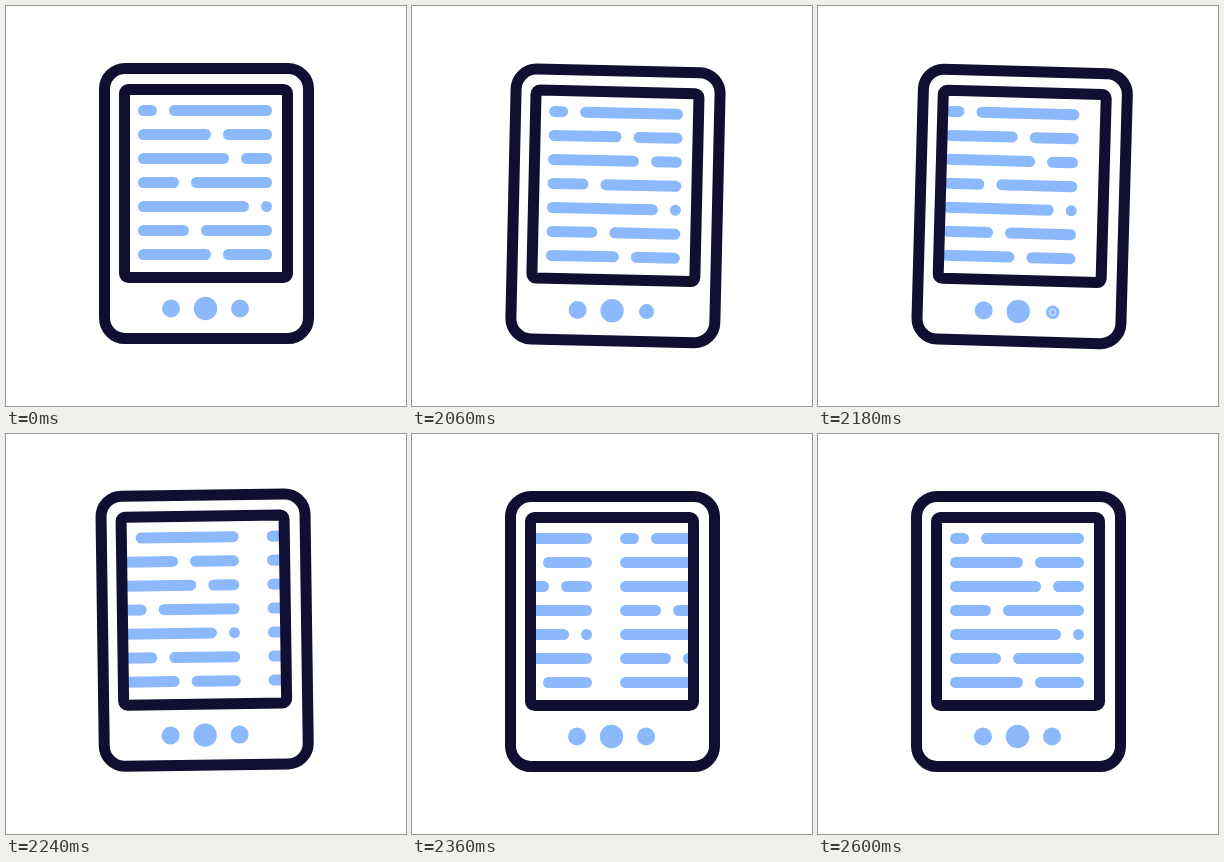
Animation, 400 px wide and 400 px high, one loop 2690 ms. Source, as an HTML page:

```html
<!DOCTYPE html>
<html lang="en">
<head>
<meta charset="utf-8">
<title>E-reader page turn</title>
<style>
  html, body { margin: 0; width: 100%; height: 100%; overflow: hidden; background: #fff; }
  svg { display: block; width: 100%; height: 100%; }
  .frame { fill: none; stroke: #110f31; stroke-width: 11; }
  .line { fill: none; stroke: #8bb9fc; stroke-width: 11; stroke-linecap: round; }
  .button { fill: #8bb9fc; }
  .ring { fill: none; stroke: #fff; }
</style>
</head>
<body>
<svg viewBox="0 0 400 400">
  <defs>
    <clipPath id="screen"><rect x="123.5" y="88" width="153" height="179"/></clipPath>
    <path id="page" class="line"/>
  </defs>
  <g id="device">
    <rect class="frame" x="98.5" y="62.5" width="204" height="270" rx="20.5"/>
    <g clip-path="url(#screen)">
      <g id="pages">
        <use href="#page"/>
        <use href="#page" x="162"/>
      </g>
    </g>
    <rect class="frame" x="118.5" y="83.5" width="163" height="188" rx="4"/>
    <circle class="button" cx="165" cy="302.5" r="9"/>
    <circle class="button" cx="199.5" cy="302.5" r="11.7"/>
    <circle id="next" class="button" cx="234" cy="302.5" r="9"/>
    <circle id="ring" class="ring" cx="234" cy="302.5" r="3.2" stroke-width="0"/>
  </g>
</svg>
<script>
  const LOOP = 2690, MOVE = 2000, STEP = 30;
  const PAGE = 162, TURN_START = 2095, TURN_END = 2605;

  // One value per step from MOVE on; the last value holds.
  const TILT = [0, .7, 1.3, 1.85, 2.4, 2.7, 1.6, .3, -.8, -1.1, -.75, -.35, 0];
  const RADIUS = [9, 8.2, 7.5, 6.8, 6, 5.6, 6.8, 8.2, 9];

  const get = id => document.getElementById(id);
  const clamp = v => Math.min(1, Math.max(0, v));
  const at = (table, i) => table[Math.min(i, table.length - 1)];

  // Where the gap in each text line begins.
  const gaps = [151, 205, 223, 173, 243, 183, 205];
  const dash = (x1, x2, y) => `M${x1 + 5.5} ${y}H${x2 - 5.5}`;
  get('page').setAttribute('d', gaps.map((x, i) => {
    const y = 104.5 + 24 * i;
    return dash(132, x, y) + dash(x + 12, 266, y);
  }).join(''));

  const device = get('device'), pages = get('pages'), next = get('next'), ring = get('ring');

  function draw(time) {
    const i = Math.max(0, Math.floor((time - MOVE) / STEP));
    const now = MOVE + Math.min(i, 20) * STEP;
    const turn = clamp((now - TURN_START) / (TURN_END - TURN_START));
    const shift = i >= 20 ? PAGE : PAGE * (1 - Math.cos(Math.PI * turn)) / 2;
    const r = at(RADIUS, i);

    device.setAttribute('transform', `rotate(${at(TILT, i)} 98 330)`);
    pages.setAttribute('transform', `translate(${-shift} 0)`);
    next.setAttribute('r', r);
    ring.setAttribute('stroke-width', 2.2 * clamp((7.2 - r) / 1.2));
  }

  const start = performance.now();
  function tick() {
    draw((performance.now() - start) % LOOP);
    requestAnimationFrame(tick);
  }
  tick();
</script>
</body>
</html>
```
